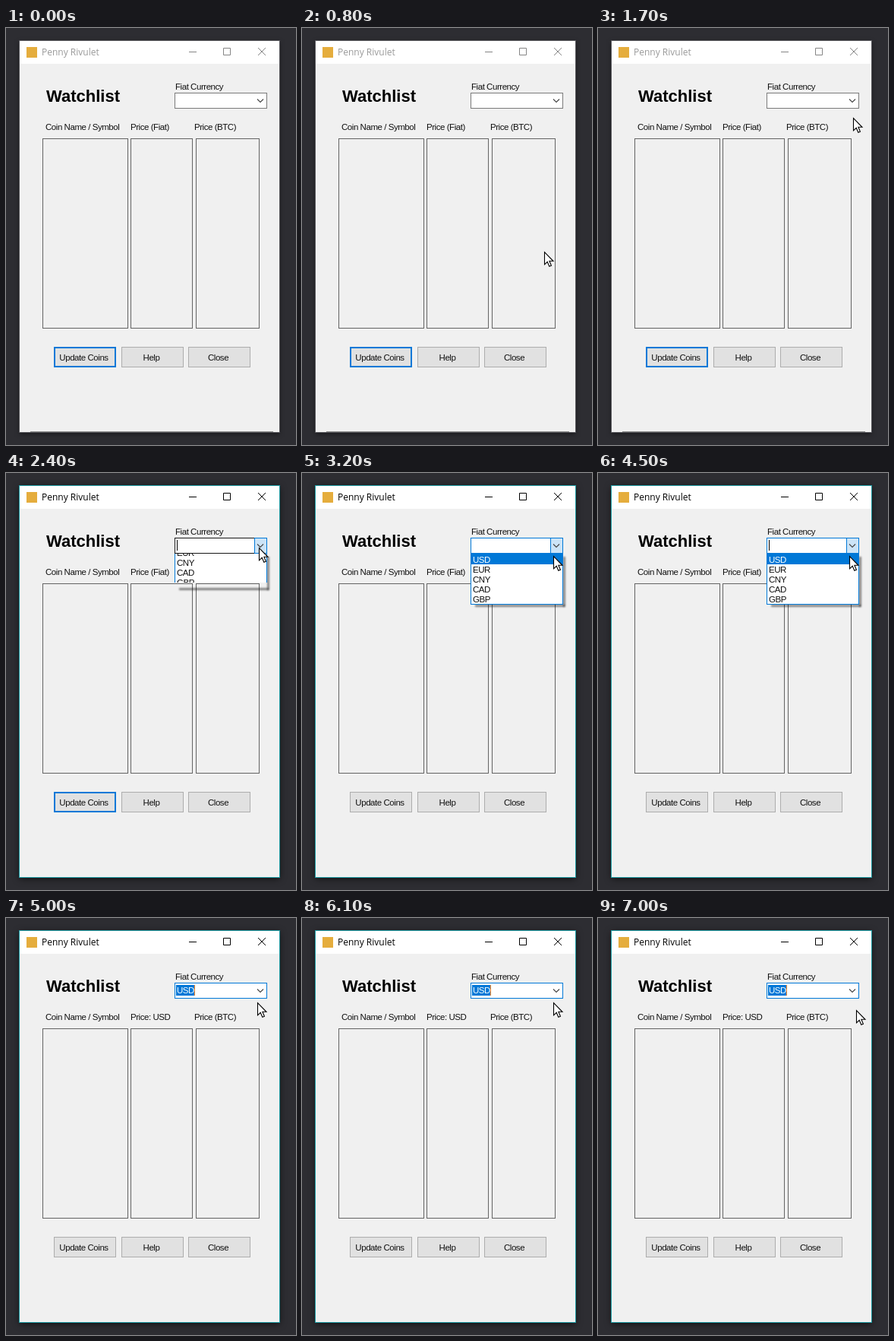
These frames come from a looping animation (382 px wide and 548 px high, 7100 ms). An HTML page:

```html
<!DOCTYPE html>
<html lang="en">
<head>
<meta charset="utf-8">
<title>Watchlist</title>
<style>
  html, body { margin: 0; width: 100%; height: 100%; overflow: hidden; background: #2d2d32; }
  svg { display: block; width: 382px; height: 548px; }
  text { font: 11.5px "Liberation Sans", Arial, sans-serif; letter-spacing: -.45px; fill: #111; white-space: pre; }
  .heading { font-size: 22px; font-weight: bold; letter-spacing: 0; fill: #000; }
  .caption { font: 12px "Open Sans", "Noto Sans", sans-serif; letter-spacing: 0; fill: #999; }
  .middle { text-anchor: middle; }
  .window { fill: #f0f0f0; filter: drop-shadow(0 2px 3px #0008); }
  .frame { fill: none; stroke: #55555a; }
  .controls { fill: none; stroke: #858585; }
  .column { fill: none; stroke: #646464; }
  .button { fill: #e1e1e1; stroke: #adadad; }
  .focus { fill: none; stroke: #0078d7; stroke-width: 2; }
  .field { fill: #fff; stroke: #7a7a7a; }
  .arrow { fill: none; stroke: none; }
  .chevron { fill: none; stroke: #444; stroke-width: 1.1; }
  .list { fill: #fff; stroke: #0078d7; }
  .mark { fill: #0078d7; }
  .shadow { fill: #000; opacity: .45; filter: blur(1px); }
  .light { fill: #fff; }

  .active .caption { fill: #000; }
  .active .frame { stroke: #1c9ba3; }
  .active .controls { stroke: #000; }
  .active .window { filter: drop-shadow(0 2px 5px #000a); }
  .active .edge { display: none; }
  .hover .field { stroke: #171717; }
  .hover .arrow, .open .arrow { fill: #cce4f7; stroke: #0078d7; }
  .focused .field { stroke: #0078d7; }
  .focused .focus { display: none; }
  .popup, .value, .picked { visibility: hidden; }
  .open .popup, .chosen .value, .pointed .picked { visibility: visible; }
</style>
</head>
<body>
<svg id="stage" viewBox="0 0 382 548">
  <defs>
    <clipPath id="reveal"><rect id="revealBox" x="222" y="106" width="123" height="68"/></clipPath>
  </defs>
  <rect width="382" height="548" fill="#2d2d32"/>
  <rect class="window" x="18" y="17" width="342" height="514"/>
  <rect class="light" x="18" y="17" width="342" height="30"/>
  <rect class="frame" x="17.5" y="16.5" width="343" height="515"/>
  <path class="edge" d="M32 530.5H352" stroke="#888"/>
  <rect x="27" y="25" width="14" height="14" fill="#e5ad3d"/>
  <text class="caption" x="47" y="36">Penny Rivulet</text>
  <path class="controls" d="M241 31.5h10M286.5 26.5h9v9h-9zM332 26l10 10M342 26l-10 10"/>

  <text class="heading" x="53" y="97">Watchlist</text>
  <text x="223" y="81">Fiat Currency</text>
  <text x="52" y="134">Coin Name / Symbol</text>
  <text id="priceLabel" x="164" y="134">Price (Fiat)</text>
  <text x="248" y="134">Price (BTC)</text>
  <g id="columns"></g>
  <g id="buttons"></g>
  <rect class="focus" x="64" y="420" width="80" height="25"/>

  <g class="popup">
    <rect id="sideShadow" class="shadow" x="344" y="110" width="3" height="66"/>
    <rect id="baseShadow" class="shadow" x="228" y="173" width="118" height="3"/>
    <g clip-path="url(#reveal)">
      <g id="list">
        <rect class="list" x="222.5" y="105.5" width="121" height="67"/>
        <rect class="mark picked" x="223" y="106" width="120" height="14"/>
      </g>
    </g>
  </g>

  <rect class="field" x="222.5" y="85.5" width="121" height="20"/>
  <rect class="arrow" x="327.5" y="85.5" width="16" height="20"/>
  <path class="chevron" d="M331 93.5l4 4 4-4"/>
  <g class="value">
    <rect class="mark" x="224" y="88" width="24" height="14"/>
    <text class="light" x="225" y="99">USD</text>
  </g>
  <rect id="caret" y="88" width="1" height="14"/>
  <path id="cursor" d="M.5 .5V16.8L4.2 13.3 6.8 19.3 9.4 18.2 6.9 12.3H12Z" fill="#fff" stroke="#000" stroke-width="1.1"/>
</svg>
<script>
const LOOP = 7100, STEP = 100;
const ACTIVATE = 2300, SETTLED = 2500, POINTED = 3200, CHOSEN = 4700;
const BLINK = 530;
const NS = "http://www.w3.org/2000/svg";
const byId = id => document.getElementById(id);

function add(parent, tag, attrs, text = "") {
  const node = document.createElementNS(NS, tag);
  for (const key in attrs) node.setAttribute(key, attrs[key]);
  node.textContent = text;
  return parent.appendChild(node);
}

for (const [x, width] of [[48.5, 112], [164.5, 81], [250.5, 83]])
  add(byId("columns"), "rect", { class: "column", x, y: 145.5, width, height: 249 });

for (const [x, label] of [[63.5, "Update Coins"], [152.5, "Help"], [240.5, "Close"]]) {
  add(byId("buttons"), "rect", { class: "button", x, y: 419.5, width: 81, height: 26 });
  add(byId("buttons"), "text", { class: "middle", x: x + 39, y: 437 }, label);
}

const rows = ["USD", "EUR", "CNY", "CAD", "GBP"].map((code, i) =>
  add(byId("list"), "text", { x: 225, y: 118 + 13 * i }, code));

// time, x, y of the pointer tip
const path = [
  [300, 384, 400], [500, 350, 352], [700, 323, 302], [800, 319, 294], [1000, 320, 282],
  [1200, 324, 238], [1400, 331, 168], [1600, 335, 124], [1700, 336, 118], [1900, 336, 117],
  [2100, 333, 100], [2200, 333, 98], [2800, 333, 98], [3200, 331, 109], [4700, 331, 109],
  [4900, 331, 111], [6100, 331, 111], [6700, 340, 121], [LOOP, 340, 121]
];

function pointerAt(t) {
  if (t < path[0][0]) return [400, 400];
  const next = Math.max(1, path.findIndex(p => p[0] > t));
  const [t0, x0, y0] = path[next - 1], [t1, x1, y1] = path[next];
  const k = (t - t0) / (t1 - t0);
  return [Math.round(x0 + (x1 - x0) * k), Math.round(y0 + (y1 - y0) * k)];
}

function draw(t) {
  const active = t >= ACTIVATE, chosen = t >= CHOSEN;
  const open = t >= SETTLED - STEP && !chosen;
  const sliding = open && t < SETTLED;
  const pointed = open && t >= POINTED;
  const states = {
    active, open, chosen, pointed,
    hover: t >= 2100 && t < SETTLED,
    focused: t >= SETTLED
  };
  byId("stage").setAttribute("class", Object.keys(states).filter(k => states[k]).join(" "));

  const lift = sliding ? 22 : 0;
  byId("list").setAttribute("transform", `translate(0 ${-lift})`);
  byId("revealBox").setAttribute("height", sliding ? 38 : 68);
  byId("sideShadow").setAttribute("height", 66 - lift);
  byId("baseShadow").setAttribute("y", 173 - lift);
  rows[0].style.fill = pointed ? "#fff" : "#111";
  byId("priceLabel").textContent = chosen ? "Price: USD" : "Price (Fiat)";

  const since = t - (chosen ? CHOSEN : ACTIVATE);
  const caret = byId("caret");
  caret.style.display = active && Math.floor(since / BLINK) % 2 === 0 ? "" : "none";
  caret.setAttribute("x", chosen ? 248 : 225);
  caret.setAttribute("fill", chosen ? "#ff8728" : "#000");

  byId("cursor").setAttribute("transform", `translate(${pointerAt(t)})`);
}

const start = performance.now();
function tick() {
  const t = (performance.now() - start) % LOOP;
  draw(Math.floor(t / STEP) * STEP);
  requestAnimationFrame(tick);
}
tick();
</script>
</body>
</html>
```
